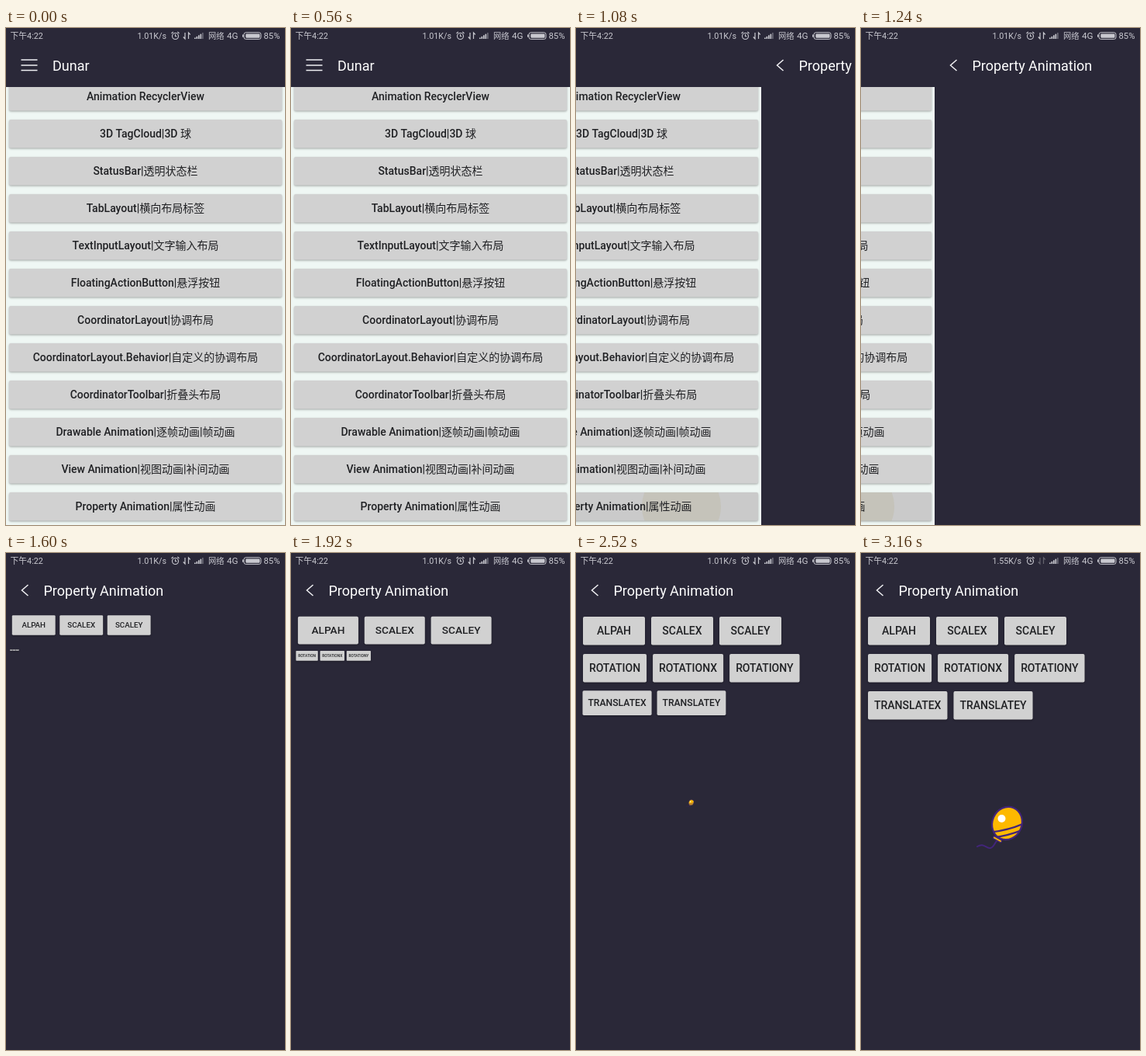
Animation, 360 px wide and 640 px high, one loop 3.2 s. Source, as an HTML page with a canvas:

```html
<!DOCTYPE html>
<html lang="zh-CN">
<head>
<meta charset="utf-8">
<style>
html, body { margin: 0; width: 100%; height: 100%; overflow: hidden; background: #2a2838; }
canvas { display: block; }
</style>
</head>
<body>
<canvas id="stage" width="360" height="640"></canvas>
<script>
const ctx = document.getElementById('stage').getContext('2d');
const LOOP = 3200, STEP = 40;
const DARK = '#2a2838', GREY = '#d1d1d1', INK = '#202124', PURPLE = '#42257a';
const FONT = 'Roboto, "Noto Sans CJK SC", "Noto Sans CJK", sans-serif';

const ITEMS = [
  'Animation RecyclerView', '3D TagCloud|3D 球', 'StatusBar|透明状态栏',
  'TabLayout|横向布局标签', 'TextInputLayout|文字输入布局',
  'FloatingActionButton|悬浮按钮', 'CoordinatorLayout|协调布局',
  'CoordinatorLayout.Behavior|自定义的协调布局', 'CoordinatorToolbar|折叠头布局',
  'Drawable Animation|逐帧动画|帧动画', 'View Animation|视图动画|补间动画',
  'Property Animation|属性动画'
];
const ROWS = [
  ['ALPAH', 'SCALEX', 'SCALEY'],
  ['ROTATION', 'ROTATIONX', 'ROTATIONY'],
  ['TRANSLATEX', 'TRANSLATEY']
];
// [time, progress] of the staggered entrance; each child starts 0.5 after the previous one
const ENTRANCE = [[1330, 0], [1600, .63], [1920, .9], [2240, 1.46], [2520, 1.765], [2800, 2.19], [3000, 2.5]];

const clamp = u => Math.min(1, Math.max(0, u));
const ease = u => (1 - Math.cos(Math.PI * clamp(u))) / 2;

function along(keys, t) {
  if (t <= keys[0][0]) return keys[0][1];
  for (let i = 1; i < keys.length; i++) {
    const [t0, v0] = keys[i - 1], [t1, v1] = keys[i];
    if (t < t1) return v0 + (v1 - v0) * (t - t0) / (t1 - t0);
  }
  return keys[keys.length - 1][1];
}

function at(x, y, scale, draw) {
  ctx.save();
  ctx.translate(x, y);
  ctx.scale(scale, scale);
  draw();
  ctx.restore();
}

function text(str, x, y, size, color, weight = 400, align = 'left') {
  ctx.font = `${weight} ${size}px ${FONT}`;
  ctx.textAlign = align;
  ctx.fillStyle = color;
  ctx.fillText(str, x, y);
}

function line(path, color, width) {
  ctx.strokeStyle = color;
  ctx.lineWidth = width;
  ctx.stroke(new Path2D(path));
}

// press: 0 to 1, darkens the button and spreads a ripple under its label
function button(label, x, y, w, press = 0) {
  ctx.save();
  ctx.beginPath();
  ctx.roundRect(x, y, w, 36.5, 2);
  ctx.shadowColor = 'rgba(0,0,0,.32)';
  ctx.shadowBlur = 2.5;
  ctx.shadowOffsetY = 1;
  ctx.fillStyle = GREY;
  ctx.fill();
  ctx.shadowColor = 'transparent';
  if (press) {
    ctx.fillStyle = `rgba(0,0,0,${.035 * press})`;
    ctx.fill();
    ctx.clip();
    ctx.beginPath();
    ctx.arc(257, y + 18, 20 + 31 * press, 0, 7);
    ctx.fillStyle = `rgba(178,168,130,${.22 * press})`;
    ctx.fill();
  }
  ctx.restore();
  text(label, x + w / 2, y + 23, 14, INK, 500, 'center');
}

function listPage(t) {
  const press = clamp((t - 640) / 260);
  ctx.fillStyle = '#eff7f4';
  ctx.fillRect(0, 76, 360, 564);
  ITEMS.forEach((label, i) => button(label, 4, 70 + 48 * i, 352, i === ITEMS.length - 1 ? press : 0));
  ctx.fillStyle = DARK;
  ctx.fillRect(0, 0, 360, 76);
  line('M19.5 41H40.5M19.5 48H40.5M19.5 54.5H40.5', '#f0f0f3', 1.5);
  text('Dunar', 60, 55, 18, '#fff');
}

function balloon() {
  ctx.lineCap = 'round';
  line('M34 55C31 58 30 64 25 64S17 57 9 62', PURPLE, 2);
  ctx.save();
  ctx.beginPath();
  ctx.ellipse(47.5, 32, 19, 21.5, .4, 0, 7);
  ctx.fillStyle = '#fdb900';
  ctx.fill();
  ctx.save();
  ctx.clip();
  line('M27 43.5Q50 41 70 32M29 50.5Q50 48 70 39.5', PURPLE, 2.4);
  ctx.restore();
  ctx.strokeStyle = PURPLE;
  ctx.lineWidth = 2.2;
  ctx.stroke();
  ctx.restore();
  line('M31 50.5L39 55', PURPLE, 4.5);
  line('M31 50.5L39 55', '#fdb900', 2);
  ctx.fillStyle = '#fff';
  ctx.beginPath();
  ctx.arc(40.5, 26, 5, 0, 7);
  ctx.fill();
}

function detailPage(t) {
  ctx.fillStyle = DARK;
  ctx.fillRect(0, 0, 360, 640);
  line('M28.5 41L20.5 48L28.5 55', '#f0f0f3', 1.5);
  text('Property Animation', 48.5, 55, 18, '#fff');
  const progress = along(ENTRANCE, t);
  const scaleOf = i => ease(progress - i / 2);
  ROWS.forEach((row, i) => {
    if (scaleOf(i)) at(5, 76 + 48 * i, scaleOf(i), () => {
      let x = 4;
      for (const label of row) {
        ctx.font = `500 14px ${FONT}`;
        const w = Math.max(80, ctx.measureText(label).width + 16);
        button(label, x, 6, w);
        x += w + 8;
      }
    });
  });
  if (scaleOf(3)) at(141, 316, scaleOf(3), balloon);
}

function statusBar(t) {
  const color = '#c9c9d0', busy = t < 3000;
  ctx.fillStyle = DARK;
  ctx.fillRect(0, 0, 360, 20);
  text('下午4:22', 5.5, 14, 10.8, color);
  text(busy ? '1.01K/s' : '1.55K/s', 169.5, 14, 10.7, color);
  line('M222.5 10.5A4 4 0 1 1 214.5 10.5A4 4 0 1 1 222.5 10.5M218.5 8V10.8H220.5M213.5 7L215.7 5M223.5 7L221.3 5', color, 1.1);
  line('M231 6V14L228.8 11.5M235.5 14V6L237.7 8.5', busy ? color : '#65646f', 1.2);
  for (let i = 0; i < 5; i++) {
    ctx.fillStyle = i < 4 ? color : '#6d6c78';
    ctx.fillRect(243 + 2.5 * i, 12.5 - 1.6 * i, 1.7, 1.5 + 1.6 * i);
  }
  text('网络', 261, 14, 10.3, color);
  text('4G', 285, 14, 11.7, color);
  ctx.strokeStyle = ctx.fillStyle = color;
  ctx.lineWidth = 1;
  ctx.beginPath();
  ctx.roundRect(307, 5.8, 22, 8.6, 2.5);
  ctx.stroke();
  ctx.beginPath();
  ctx.roundRect(309.3, 7.4, 18.2, 5.4, 1.2);
  ctx.fill();
  ctx.fillRect(305, 8.5, 1.5, 3.2);
  text('85%', 332.5, 14, 11.3, color);
}

function draw(t) {
  const slide = Math.round(360 * ease((t - 840) / 610));
  if (slide < 360) at(-slide, 0, 1, () => listPage(t));
  if (slide > 0) at(360 - slide, 0, 1, () => detailPage(t));
  statusBar(t);
}

const start = performance.now();
function tick() {
  const t = (performance.now() - start) % LOOP;
  draw(Math.floor(t / STEP) * STEP);
  requestAnimationFrame(tick);
}
tick();
</script>
</body>
</html>
```
